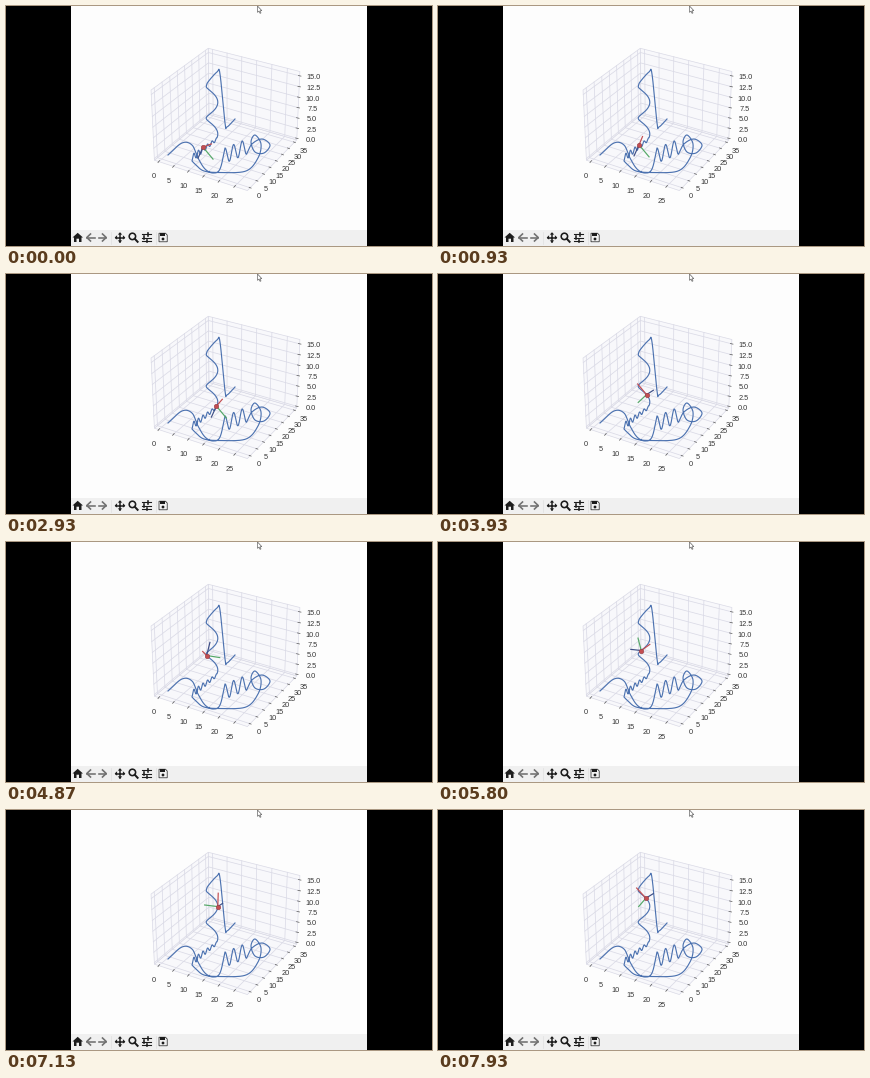
Recreate the animation shown at these times as a matplotlib script. Size 426x240 px, loop 8000 ms.

```python
import numpy as np
import matplotlib.pyplot as plt
from matplotlib.animation import FuncAnimation
from matplotlib.patches import Circle, Polygon, Rectangle

W, H, DPI = 426, 240, 100
FRAMES, LOOP = 120, 8000
PX = 72 / DPI
BLUE, GREEN, RED, NAVY = "#4c72b0", "#55a868", "#c44e52", "#3f4f86"
GRID, PANE, TICK, TEXT = "#dadae6", "#f8f8fb", "#5a5a5a", "#363636"
BAR = "#f0f0f0"

plt.rcParams["font.family"] = "Liberation Sans"
fig = plt.figure(figsize=(W / DPI, H / DPI), dpi=DPI, facecolor="black")
ax = fig.add_axes([0, 0, 1, 1])
ax.set_xlim(0, W)
ax.set_ylim(H, 0)
ax.axis("off")


def line(pts, color, width=1.0, z=2):
    x, y = np.transpose(pts)
    return ax.plot(x, y, color=color, lw=width * PX, zorder=z)[0]


def rect(x, y, w, h, color, z=1):
    ax.add_patch(Rectangle((x, y), w, h, fc=color, ec="none", zorder=z))


def poly(pts, color, edge="none", z=5):
    ax.add_patch(Polygon(pts, fc=color, ec=edge, lw=0.7 * PX, zorder=z))


# ---- 3D box, seen from azimuth -60, elevation 30 ----
LOW = np.array([-1.5, -2, -0.4])
HIGH = np.array([29, 37, 16])
HALF = np.array([0.595, 0.595, 0.4464])
RIGHT = np.array([0.866, 0.5, 0])
UP = np.array([-0.25, 0.433, 0.866])
EYE = np.array([0.433, -0.75, 0.5])


def project(p):
    q = (2 * (np.array(p) - LOW) / (HIGH - LOW) - 1) * HALF
    s = 89.5 * 10 / (10 - q @ EYE)
    return np.array([220.9 + s * (q @ RIGHT), 110 - s * (q @ UP)])


def tick(pos, direction, offset, text):
    d = np.array(direction)
    line([pos - d, pos + d], TICK, 0.7)
    ax.text(*(pos + offset), text, fontsize=7.4 * PX, color=TEXT,
            ha="center", va="center_baseline", zorder=3)


def draw_box():
    (x0, y0, z0), (x1, y1, z1) = LOW, HIGH
    floor = [(x0, y0, z0), (x1, y0, z0), (x1, y1, z0), (x0, y1, z0)]
    left = [(x0, y0, z0), (x0, y1, z0), (x0, y1, z1), (x0, y0, z1)]
    back = [(x0, y1, z0), (x1, y1, z0), (x1, y1, z1), (x0, y1, z1)]
    for pane in (floor, left, back):
        poly([project(p) for p in pane], PANE, GRID, 1)

    def grid(*pts):
        line([project(p) for p in pts], GRID, 0.75)

    for x in range(0, 30, 5):
        grid((x, y0, z0), (x, y1, z0), (x, y1, z1))
        tick(project((x, y0, z0)), (-0.8, 1), (-4.5, 14), str(x))
    for y in range(0, 40, 5):
        grid((x1, y, z0), (x0, y, z0), (x0, y, z1))
        tick(project((x1, y, z0)), (1, 0.4), (9, 8), str(y))
    for z in np.arange(0, 15.1, 2.5):
        grid((x0, y0, z), (x0, y1, z), (x1, y1, z))
        tick(project((x1, y1, z)), (1.3, 0.3), (14, 0.8), f"{z:.1f}")


# ---- path: splines, a wave, a ripple and a helix joined end to end ----
def spline(pts, n=20):
    """Catmull-Rom curve through a few points."""
    p = np.array(pts, float)
    p = np.vstack([2 * p[0] - p[1], p, 2 * p[-1] - p[-2]])
    t = np.linspace(0, 1, n)[:, None]
    parts = [0.5 * (2 * b + (c - a) * t + (2 * a - 5 * b + 4 * c - d) * t**2
                    + (3 * b - a - 3 * c + d) * t**3)
             for a, b, c, d in zip(p, p[1:], p[2:], p[3:])]
    return np.vstack(parts)


def wave(k):
    return np.stack([219 + 8.6 * k,
                     149.5 - 3.5 * k - 7.5 * np.cos(2 * np.pi * k)], -1)


def ripple_phase(s):
    return 11 * np.pi * (s - 0.44)


def ripple(s):
    swing = (3.4 - 2 * s) * np.cos(ripple_phase(s))
    return np.stack([186 + 25 * s, 152 - 19 * s - swing], -1)


TURN, RISE, RADIUS = 1.6, 8.1, 5.8


def helix_phase(t):
    return 1.22 + TURN * (t - 3.93)


def helix(t):
    p = helix_phase(t)
    return np.stack([206 + RADIUS * np.cos(p),
                     96 + RISE * (7.13 - t) - 2 * np.sin(p)], -1)


def draw_path():
    start = [(162, 149), (176, 137), (186, 139), (192, 152), (199, 163),
             (207, 167), (214, 163), wave(0)]
    sweep = [wave(2.5), (246, 138), (256, 133), (264, 139), (258, 147),
             (249, 146), (245, 136), (249, 129), (255, 138), (252, 152),
             (240, 165), (214, 166.5), (198, 165), (190, 159), ripple(0)]
    top = [helix(9), (202, 76), (211, 66), (214, 68), (219, 117),
           (221, 121), (229, 113)]
    line(np.vstack([spline(start), wave(np.linspace(0, 2.5, 120)),
                    spline(sweep), ripple(np.linspace(0, 1, 150)),
                    helix(np.linspace(2.95, 9, 150)), spline(top)]),
         BLUE, 1.15, 6)


# ---- moving frame: tangent, normal, binormal ----
SWITCH = 2.95


def on_ripple(t):
    s = 0.44 + 0.187 * t
    pos = ripple(s)
    step = ripple(s + 0.005) - pos
    side = np.sign(np.cos(ripple_phase(s)))
    return pos, [9 * step / np.hypot(*step),
                 side * np.array([10, 12]), side * np.array([-5, 11])]


def on_helix(t):
    p = helix_phase(t)
    c, s = np.cos(p), np.sin(p)
    tangent = np.array([-0.7 * s, 0.7 * c, 0.7])
    normal = np.array([-c, -s, 0])
    binormal = np.cross(tangent, normal)
    roll = np.radians(20 - 40 * s)
    axes = [tangent,
            normal * np.cos(roll) + binormal * np.sin(roll),
            binormal * np.cos(roll) - normal * np.sin(roll)]
    flat = [14 * np.array([a[0], -0.5 * a[1] - 0.866 * a[2]]) for a in axes]
    return helix(t), flat


# ---- window toolbar ----
def draw_toolbar():
    ink, dim = "#1c1c1c", "#707070"
    y = 231.5
    rect(65, 224, 296, 16, BAR)
    poly([(66.5, y), (71.7, 226.8), (77, y), (75.5, y), (75.5, 236),
          (73, 236), (73, 232.7), (70.5, 232.7), (70.5, 236), (68, 236),
          (68, y)], ink)
    for x, d in ((84.5, 1), (96.5, -1)):
        line([(x - 3.5 * d, y), (x + 4 * d, y)], dim, 1.6, 5)
        line([(x, y - 3.5), (x - 3.7 * d, y), (x, y + 3.5)], dim, 1.6, 5)
    for x in (105, 149.5):
        line([(x, 226), (x, 238)], "#e0e0e0", 0.7, 4)
    hub = np.array([114, y])
    for dx, dy in ((1, 0), (-1, 0), (0, 1), (0, -1)):
        out, side = np.array([dx, dy]), np.array([dy, dx])
        line([hub, hub + 4 * out], ink, 1.5, 5)
        poly([hub + 5.3 * out, hub + 2.9 * out + 2.2 * side,
              hub + 2.9 * out - 2.2 * side], ink)
    ax.add_patch(Circle((126.4, 230.4), 3.2, fc="none", ec=ink,
                        lw=1.6 * PX, zorder=5))
    line([(128.8, 232.8), (131.6, 235.8)], ink, 2, 5)
    for dy, x in ((-3.2, 142), (0, 138), (3.2, 141)):
        line([(135.7, y + dy), (144.7, y + dy)], ink, 1.1, 5)
        line([(x, y + dy - 1.2), (x, y + dy + 1.2)], ink, 1.6, 5)
    poly([(153, 227.2), (159.5, 227.2), (161.2, 229), (161.2, 235.8),
          (153, 235.8)], BAR, ink)
    rect(154.3, 227.4, 4.4, 2.5, ink, 6)
    ax.add_patch(Circle((157, 233), 1.4, fc=ink, zorder=6))


rect(65, 0, 296, 240, "#fdfdfd", 0)
draw_box()
draw_toolbar()
draw_path()
poly([(251.5, 0), (251.5, 6.4), (253, 5.1), (254.1, 7.4), (255, 6.9),
      (254, 4.8), (255.8, 4.6)], "white", "#666666", 9)

arms = [line([(0, 0), (0, 0)], c, 1.2, 7) for c in (RED, GREEN, NAVY)]
dot, = ax.plot([], [], "o", ms=4.5 * PX, mfc=RED, mec="#8f3b42",
               mew=0.5 * PX, zorder=8)


def update(n):
    t = n * LOOP / FRAMES / 1000
    (x, y), tips = on_ripple(t) if t < SWITCH else on_helix(t)
    for arm, (dx, dy) in zip(arms, tips):
        arm.set_data([x, x + dx], [y, y + dy])
    dot.set_data([x], [y])
    return [*arms, dot]


anim = FuncAnimation(fig, update, frames=FRAMES, interval=LOOP / FRAMES,
                     repeat=True, repeat_delay=0, blit=False)
plt.show()
```
